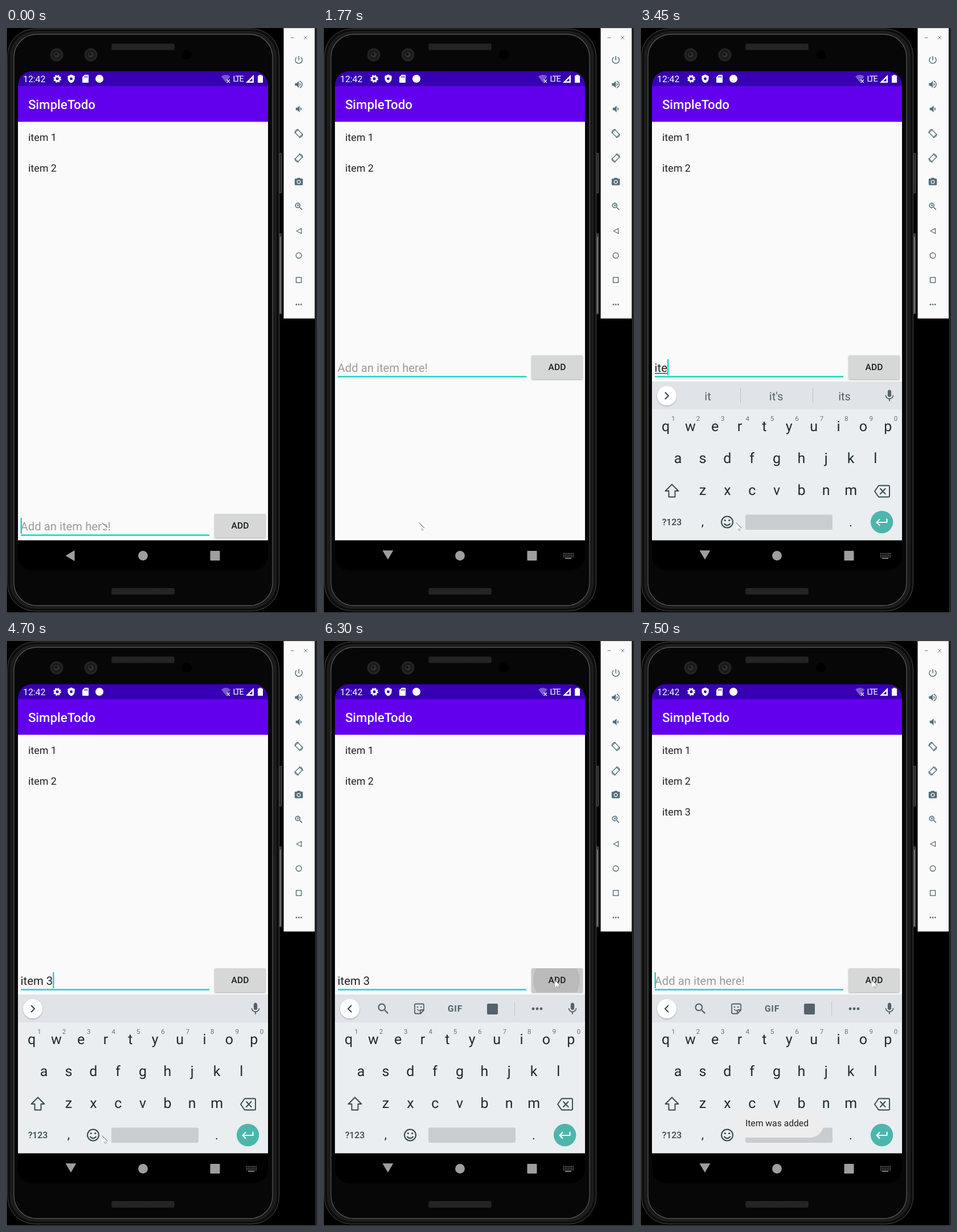
Animation, 546 px wide and 1026 px high, one loop 8 s. Source, as an HTML page:

```html
<!DOCTYPE html>
<html lang="en">
<head>
<meta charset="utf-8">
<title>Todo list demo</title>
<style>
  html, body { margin: 0; width: 100%; height: 100%; overflow: hidden; background: #000; }
  svg { display: block; width: 546px; height: 1026px; }
  text { font-family: Roboto, "Noto Sans", sans-serif; white-space: pre; text-rendering: geometricPrecision; }
  .mid { text-anchor: middle; }
  .line { fill: none; stroke-linecap: round; stroke-linejoin: round; }
</style>
</head>
<body>
<svg id="stage" viewBox="0 0 546 1026" xmlns="http://www.w3.org/2000/svg"></svg>
<script>
const LOOP = 8000;
const LIFT = 278;      // how far the input row rises above the keyboard
const TEXT_X = 25.6;

const glyphs = {
  power: 'M13 3h-2v10h2V3zm4.83 2.17l-1.42 1.42C17.99 7.86 19 9.81 19 12c0 3.87-3.13 7-7 7s-7-3.13-7-7c0-2.19 1.01-4.14 2.58-5.42L6.17 5.17C4.23 6.82 3 9.26 3 12c0 4.97 4.03 9 9 9s9-4.03 9-9c0-2.74-1.23-5.18-3.17-6.83z',
  louder: 'M3 9v6h4l5 5V4L7 9H3zm13.5 3c0-1.77-1.02-3.29-2.5-4.03v8.05c1.48-.73 2.5-2.25 2.5-4.02zM14 3.23v2.06c2.89.86 5 3.54 5 6.71s-2.11 5.85-5 6.71v2.06c4.01-.91 7-4.49 7-8.77s-2.99-7.86-7-8.77z',
  quieter: 'M18.5 12c0-1.77-1.02-3.29-2.5-4.03v8.05c1.48-.73 2.5-2.25 2.5-4.02zM5 9v6h4l5 5V4L9 9H5z',
  camera: 'M9 2L7.17 4H4c-1.1 0-2 .9-2 2v12c0 1.1.9 2 2 2h16c1.1 0 2-.9 2-2V6c0-1.1-.9-2-2-2h-3.17L15 2H9zm3 15c-2.76 0-5-2.24-5-5s2.24-5 5-5 5 2.24 5 5-2.24 5-5 5zm0-8.2a3.2 3.2 0 1 0 0 6.4a3.2 3.2 0 1 0 0-6.4z',
  search: 'M15.5 14h-.79l-.28-.27C15.41 12.59 16 11.11 16 9.5 16 5.91 13.09 3 9.5 3S3 5.91 3 9.5 5.91 16 9.5 16c1.61 0 3.09-.59 4.23-1.57l.27.28v.79l5 4.99L20.49 19l-4.99-5zm-6 0C7.01 14 5 11.99 5 9.5S7.01 5 9.5 5 14 7.01 14 9.5 11.99 14 9.5 14z',
  mic: 'M12 14c1.66 0 3-1.34 3-3V5c0-1.66-1.34-3-3-3S9 3.34 9 5v6c0 1.66 1.34 3 3 3zM17.3 11c0 3-2.54 5.1-5.3 5.1S6.7 14 6.7 11H5c0 3.41 2.72 6.23 6 6.72V21h2v-3.28c3.28-.48 6-3.3 6-6.72h-1.7z',
  shield: 'M12 1L3 5v6c0 5.55 3.84 10.74 9 12 5.16-1.26 9-6.45 9-12V5z'
};

const rect = (x, y, w, h, fill, more = '') =>
  `<rect x="${x}" y="${y}" width="${w}" height="${h}" fill="${fill}" ${more}/>`;
const disc = (x, y, r, fill, more = '') =>
  `<circle cx="${x}" cy="${y}" r="${r}" fill="${fill}" ${more}/>`;
const path = (d, fill, more = '') => `<path d="${d}" fill="${fill}" ${more}/>`;
const line = (d, color, width, more = '') =>
  `<path class="line" d="${d}" stroke="${color}" stroke-width="${width}" ${more}/>`;
const text = (str, x, y, size, fill, more = '') =>
  `<text x="${x}" y="${y}" font-size="${size}" fill="${fill}" ${more}>${str}</text>`;
const label = (str, x, y, size, fill, more = '') => text(str, x, y, size, fill, 'class="mid" ' + more);
const group = (id, body, more = '') => `<g id="${id}" ${more}>${body}</g>`;
const icon = (name, x, y, scale, fill) =>
  path(glyphs[name], fill, `transform="translate(${x} ${y}) scale(${scale}) translate(-12 -12)"`);
const dots = (x, y, gap, r, fill) => [-gap, 0, gap].map(d => disc(x + d, y, r, fill)).join('');

function phone() {
  const lens = x => disc(x, 47, 11.5, '#242425') + disc(x, 47, 8, '#19191b') +
    disc(x, 47, 5, '#2c3035') + disc(x - 1, 46, 2.2, '#111');
  const grille = y => rect(185, y, 111, 12, '#1c1c1c', 'rx="3"') +
    rect(186, y + 1, 109, 10, 'url(#mesh)', 'rx="2"');
  return rect(0, 0, 546, 1026, '#000') +
    rect(0, 0, 1, 1026, '#6a6a6a') + rect(0, 1025, 546, 1, '#555') +
    rect(543.5, 0, 1.5, 1026, '#444') +
    rect(479, 219, 5.5, 71, '#3a3a3a', 'rx="1.5"') + rect(481, 221, 1, 67, '#111') +
    rect(479, 360, 5.5, 142, '#3a3a3a', 'rx="1.5"') + rect(481, 366, 1.5, 134, '#8a8580') +
    rect(2.5, 1.5, 477, 1021, '#0d0d0d', 'rx="48" stroke="#484848"') +
    rect(8, 6.5, 466, 1011, '#1a1a1a', 'rx="44" stroke="#2b2b2b"') +
    rect(14, 11, 454, 1002, '#070707', 'rx="40" stroke="#555" stroke-width="1.3"') +
    lens(89) + lens(149) + disc(317.5, 47, 8.5, '#000') + grille(27) + grille(982);
}

function sidebar() {
  const c = '#546e7a';
  const turn = (y, flip) => `<g transform="translate(514 ${y}) scale(${flip} 1)">` +
    rect(-5.6, -3.6, 11.2, 7.2, 'none', `transform="rotate(45)" stroke="${c}" stroke-width="1.3"`) +
    line('M-7 -1A7 7 0 0 1 -1 -7.3M7 1A7 7 0 0 1 1 7.3', c, 1.2) + '</g>';
  return rect(487.5, 0, 54.5, 509.5, '#fafafa') + rect(487.5, 0, 54.5, 1, '#ccc') +
    line('M500 17h5M523.5 14.5l5 5m0-5l-5 5', '#777', 1) +
    icon('power', 514, 56, .75, c) + icon('louder', 514, 99, .75, c) +
    icon('quieter', 514, 142, .75, c) + turn(185, 1) + turn(228, -1) +
    icon('camera', 514, 270, .72, c) + icon('search', 514, 313, .73, c) +
    line('M510.5 311h4m-2-2v4', c, 1) +
    line('M518.5 351.5v9l-8.5-4.5z', c, 1.3) +
    disc(514, 399, 4.8, 'none', `stroke="${c}" stroke-width="1.4"`) +
    rect(509.5, 437.5, 9, 9, 'none', `stroke="${c}" stroke-width="1.4"`) +
    dots(514, 485, 4.2, 1.4, c);
}

function statusBar() {
  const bar = '#3700b3';
  return rect(21, 75.5, 439, 27, bar) + text('12:42', 30, 95, 15.8, '#fff') +
    disc(90, 89, 4, 'none', 'stroke="#fff" stroke-width="3"') +
    disc(90, 89, 5.9, 'none', 'stroke="#fff" stroke-width="2" stroke-dasharray="2.6 2.03"') +
    icon('shield', 114.5, 89, .68, '#fff') + disc(114.5, 89, 2.4, bar) +
    path('M138 82h6q1 0 1 1v12q0 1 -1 1h-9q-1 0 -1-1v-9z', '#fff') +
    line('M138 84.5v2.5m2.3-2.5v2.5m2.3-2.5v2.5', bar, 1) +
    disc(164, 89, 7, '#fff') +
    path('M378 85Q386 79 394 85L386 95.5Z', '#7a58cb') +
    line('M388 91l4.5 4.5m0-4.5l-4.5 4.5', '#fff', 1.3) +
    text('LTE', 398.5, 94.3, 14.5, '#fff', 'letter-spacing="-1.8"') +
    path('M435 82v14h-14z', '#fff') + path('M432.5 88v5.5h-5.5z', bar) +
    path('M444.5 82h4v1.5h2.5V96h-9V83.5h2.5z', '#fff');
}

function app() {
  const item = n => text('item ' + n, 39, 198.3 + (n - 1) * 53.6, 17.9, '#212121');
  return rect(21, 102, 439, 63, '#6200ee') +
    text('SimpleTodo', 38.9, 142, 22.3, '#fff', 'font-weight="500"') +
    rect(21, 164.5, 439, 734.5, '#fafafa') +
    item(1) + item(2) + group('newItem', item(3));
}

function inputRow() {
  return text('Add an item here!', TEXT_X, 881, 20.3, '#9b9b9b', 'id="hint"') +
    text('', TEXT_X, 881, 20.3, '#212121', 'id="typed"') +
    rect(26, 883, 0, 1.2, '#212121', 'id="compose"') +
    rect(26, 888.2, 331, 2.6, '#1fd5c6') +
    rect(25.6, 859, 2.3, 28, '#12cfc0', 'id="caret"') +
    rect(366, 852, 90, 42, '#d6d7d7', 'rx="2" filter="url(#shadow)"') +
    group('press', rect(366, 852, 90, 42, '#c9caca') + disc(410, 873, 41, '#bababa', 'id="ripple"'),
      'clip-path="url(#button)"') +
    label('ADD', 411, 878, 15.6, '#1c1c1c', 'font-weight="500"');
}

function keyboard() {
  const dark = '#1d2a30', soft = '#53626b';
  const row = (keys, x, y) => [...keys].map((k, i) => label(k, x + i * 43.35, y, 25, dark)).join('');
  const tools = icon('search', 106, 645, 1.05, soft) +
    line('M163 636.5h12q2 0 2 2v9l-6 6h-8q-2 0-2-2v-13q0-2 2-2zM171 653v-4q0-2 2-2h4', soft, 1.8) +
    line('M165.5 646q3 4 6 1', soft, 1.4) + disc(166, 642, 1.3, soft) + disc(172, 642, 1.3, soft) +
    label('GIF', 232, 650.3, 15.5, soft, 'font-weight="700" letter-spacing=".8"') +
    rect(288, 636, 19, 19, soft, 'rx="2"') + rect(336, 632, 1, 26, '#c3c9cd') +
    dots(376, 645, 7, 2.4, soft);
  const words = [119, 239, 359].map((x, i) => label('', x, 653, 20, soft, `id="word${i}"`)).join('') +
    rect(176, 631, 1, 27, '#b9c0c4') + rect(303, 631, 1, 27, '#b9c0c4');
  return rect(21, 620, 439, 280, '#eaeef1') + rect(21, 620, 439, 49, '#e0e4e8') +
    disc(47, 645, 17, '#fff', 'filter="url(#shadow)"') +
    line('M49.5 639.5l-5.5 5.5 5.5 5.5', '#37474f', 2, 'id="chevron"') +
    group('tools', tools) + group('words', words) + icon('mic', 438, 645, 1.05, soft) +
    row('qwertyuiop', 45, 707) + row('asdfghjkl', 66.6, 763) + row('zxcvbnm', 110, 819) +
    [...'1234567890'].map((n, i) => label(n, 58.5 + i * 43.4, 689, 11.5, '#66737b')).join('') +
    line('M56 800.5l11.5 11.5h-6v10.5h-11v-10.5h-6z', '#37474f', 1.9) +
    line('M419 802.5h17.5q1.5 0 1.5 1.5v17q0 1.5-1.5 1.5H419l-7-10zM422 808l8.5 9m0-9l-8.5 9', '#37474f', 1.9) +
    label('?123', 56, 872, 15.8, '#37474f', 'font-weight="500"') +
    label(',', 110, 873, 22, dark) + label('.', 370, 874, 22, dark) +
    disc(153, 866.5, 10, 'none', 'stroke="#37474f" stroke-width="2"') +
    disc(149.3, 863.5, 1.6, '#37474f') + disc(156.7, 863.5, 1.6, '#37474f') +
    line('M148 869.5q5 5.5 10 0', '#37474f', 2) +
    rect(185, 853.5, 153, 26.5, '#c9cdd0', 'rx="3"') +
    disc(424.6, 866.5, 19.7, '#4db6ac') +
    line('M433.5 861.5v5.5h-18m5-5l-5 5 5 5', '#fff', 2.2);
}

function navBar() {
  const c = '#9e9e9e';
  const keys = [921.5, 924.5, 927.5].map(y =>
    line(`M422.5 ${y}h17`, c, 1.7, 'stroke-dasharray="0 2.8"')).join('') + rect(425, 929.5, 11, 1.5, c);
  return rect(21, 898.5, 439, 53, '#000') +
    path('M104.5 925.5l16-9.5v19z', c, 'id="back"') +
    disc(240.5, 925.5, 8.4, c) + rect(358.5, 917, 17, 17, c, 'rx="1"') + group('keysIcon', keys);
}

const toast = rect(159, 820, 164, 51, '#ededee', 'rx="25"') + label('Item was added', 240.5, 850.5, 15.7, '#212121');
const pointer = path('M0 0V12L3 9.5L5 13.5L7 12.5L5.3 8.8H8.8Z', '#fff') +
  line('M0 0L8.8 8.8', '#444', .9) + line('M5.3 9.5L7 12.5L5 13.5L3 10', '#777', .7);

document.getElementById('stage').innerHTML = `<defs>
  <pattern id="mesh" width="3" height="3" patternUnits="userSpaceOnUse">${rect(0, 0, 3, 3, '#2a2a2a')}${disc(1.5, 1.5, 1, '#171717')}</pattern>
  <clipPath id="screen">${rect(21, 75.5, 439, 875.5, '#fff', 'rx="25"')}</clipPath>
  <clipPath id="view">${rect(21, 76, 439, 822.5, '#fff')}</clipPath>
  <clipPath id="button">${rect(366, 852, 90, 42, '#fff', 'rx="2"')}</clipPath>
  <filter id="shadow" x="-20%" y="-20%" width="140%" height="150%">
    <feDropShadow dx="0" dy="1.2" stdDeviation="1.1" flood-opacity=".3"/></filter></defs>` +
  phone() + sidebar() +
  `<g clip-path="url(#screen)">${statusBar()}${app()}${group('row', inputRow())}
   <g clip-path="url(#view)">${group('keyboard', keyboard())}</g>${navBar()}${group('toast', toast)}</g>` +
  group('pointer', pointer);

const ui = {};
document.querySelectorAll('[id]').forEach(el => ui[el.id] = el);

// Each step overrides only what changes at that time.
const steps = [
  [0, { caret: 1, typed: '', compose: 0, lift: 0, keys: 0, nav: 0, strip: 'tools', press: 0, ripple: 0, toast: 0, item: 0, at: [169, 868] }],
  [530, { caret: 0 }], [1020, { caret: 1 }], [1310, { caret: 0 }],
  [1620, { nav: .5 }],
  [1770, { nav: 1, lift: 1 }],
  [1920, { keys: .8 }],
  [2070, { keys: 1, caret: 1 }],
  [2500, { caret: 0 }],
  [2900, { typed: 'i', compose: 1, caret: 1 }],
  [3050, { strip: ['I', "I'm", 'in'] }],
  [3300, { typed: 'it', strip: ['it', "it's", 'its'] }],
  [3450, { typed: 'ite' }],
  [3600, { typed: 'item', strip: ['item', 'items', "item's"] }],
  [4160, { caret: 0 }],
  [4440, { typed: 'item ', compose: 0, caret: 1, strip: '' }],
  [4700, { typed: 'item 3' }],
  [4850, { strip: 'tools' }],
  [5150, { caret: 0, at: [186, 850] }],
  [5300, { at: [258, 764] }],
  [5450, { at: [366, 652] }],
  [5600, { at: [453, 572], caret: 1 }],
  [5720, { at: [424, 586] }],
  [5870, { at: [407.5, 595] }],
  [6150, { caret: 0, press: 1, ripple: 18 }],
  [6300, { ripple: 41 }],
  [6420, { ripple: 52, typed: '', item: 1, caret: 1 }],
  [6540, { press: .65, toast: .3 }],
  [6660, { press: .3, toast: .65 }],
  [6800, { press: 0, toast: .9 }],
  [6930, { toast: 1 }],
  [7080, { caret: 0 }],
  [7500, { caret: 1 }]
];

const set = (id, values) => { for (const k in values) ui[id].setAttribute(k, values[k]); };

function render(now) {
  const t = now % LOOP;
  const s = Object.assign({}, ...steps.filter(([at]) => at <= t).map(([, change]) => change));

  ui.typed.textContent = s.typed;
  const width = s.typed ? ui.typed.getComputedTextLength() : 0;
  set('hint', { opacity: s.typed ? 0 : 1 });
  set('compose', { width: s.compose ? width : 0 });
  set('caret', { x: TEXT_X + width, opacity: s.caret });
  set('row', { transform: `translate(0 ${-LIFT * s.lift})` });
  set('press', { opacity: s.press });
  set('ripple', { r: s.ripple });
  set('newItem', { opacity: s.item });
  set('toast', { opacity: s.toast });

  const tools = s.strip === 'tools', words = Array.isArray(s.strip);
  set('keyboard', { opacity: s.keys, transform: `translate(0 ${(1 - s.keys) * 200})` });
  set('tools', { opacity: tools ? 1 : 0 });
  set('words', { opacity: words ? 1 : 0 });
  set('chevron', { transform: tools ? '' : 'rotate(180 47 645)' });
  if (words) s.strip.forEach((word, i) => ui['word' + i].textContent = word);

  set('back', { transform: `rotate(${-90 * s.nav} 112.6 924.2)` });
  set('keysIcon', { opacity: s.nav });
  set('pointer', { transform: `translate(${s.at})` });
}

const start = performance.now();
function tick() {
  render(performance.now() - start);
  requestAnimationFrame(tick);
}
tick();
</script>
</body>
</html>
```
